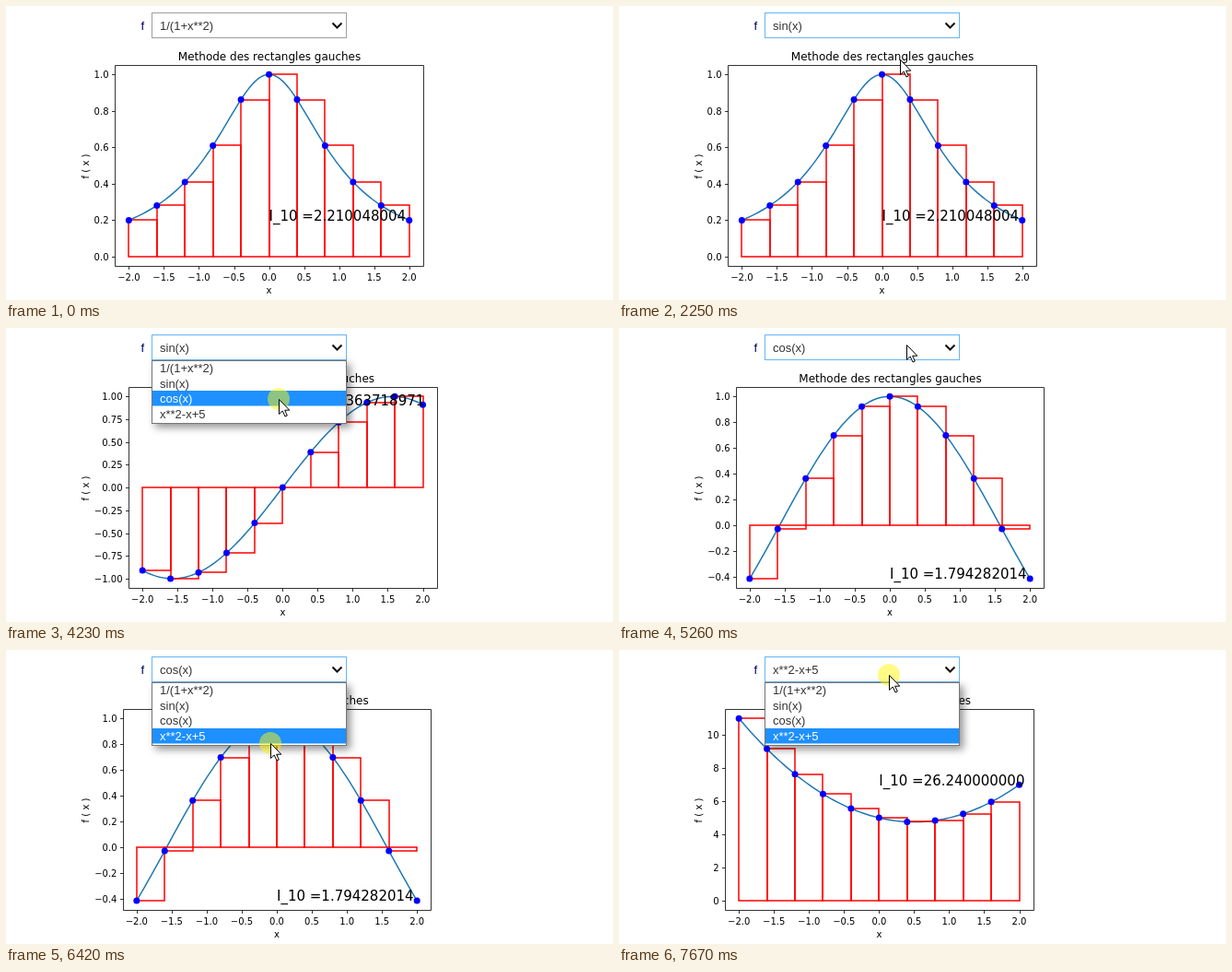
Recreate the animation shown at these times as an HTML page. Size 659 px wide and 319 px high, loop 8 s.

```html
<!DOCTYPE html>
<html lang="fr">
<head>
<meta charset="utf-8">
<title>Methode des rectangles gauches</title>
<style>
  html, body { margin: 0; width: 100%; height: 100%; overflow: hidden; background: #fff; }
  svg { display: block; }
  .plot { font: 10px "DejaVu Sans", sans-serif; }
  .title { font-size: 12px; }
  .sum { font-size: 15px; }
  .frame { fill: none; stroke: #000; stroke-width: .8; }
  .curve { fill: none; stroke: #1f77b4; stroke-width: 1.5; stroke-linejoin: round; }
  .bar { fill: none; stroke: #f00; stroke-width: 1.5; }
  .dot { fill: #00f; }
  .ui { font: 13px "Liberation Sans", Arial, sans-serif; fill: #333; }
  .popup { fill: #fff; stroke: #767676; filter: drop-shadow(4px 4px 4px rgba(0, 0, 0, .42)); }
</style>
</head>
<body>
<svg id="stage" width="659" height="319" viewBox="0 0 659 319"></svg>
<script>
const LOOP = 8000, STEP = 70;
const TOP = 64.4, WIDTH = 334.8, HEIGHT = 217.44;
const ROW_TOP = 35.5, ROW = 16.7;

// ticks: [first, last, step, decimals], first and last counted in steps
const functions = [
  { name: '1/(1+x**2)', f: x => 1 / (1 + x * x), cx: 285.55, range: [0, 1], ticks: [0, 5, .2, 1] },
  { name: 'sin(x)', f: Math.sin, cx: 300.34, range: [-1, 1], ticks: [-4, 4, .25, 2] },
  { name: 'cos(x)', f: Math.cos, cx: 294, range: [Math.cos(2), 1], ticks: [-2, 5, .2, 1] },
  { name: 'x**2-x+5', f: x => x * x - x + 5, cx: 282.35, range: [0, 11], ticks: [0, 5, 2, 0] }
];

// [start, end, x, y]: the pointer reaches x, y at the end time
const moves = [
  [260, 960, 316, 25], [1360, 1900, 305, 58], [2450, 2730, 326, 7],
  [2930, 3140, 324, 24], [3540, 4030, 296, 77], [4570, 4910, 313, 17],
  [5260, 5260, 312, 18], [5660, 6160, 287, 101], [6840, 7400, 293, 27]
];
const clicks = [[1160, 1360], [2030, 2250], [3340, 3540], [4230, 4430], [5390, 5660], [6420, 6640], [7670, LOOP]];
const openings = [[1230, 2250], [3340, 4430], [5460, 6640], [7670, LOOP]];
const choiceTimes = [2250, 4430, 6640];
const plotTimes = [2450, 4630, 6840];
const focusTime = 1160;

const stage = document.getElementById('stage');

function add(parent, tag, attrs, text) {
  const node = document.createElementNS('http://www.w3.org/2000/svg', tag);
  for (const key in attrs) node.setAttribute(key, attrs[key]);
  if (text !== undefined) node.textContent = text;
  return parent.appendChild(node);
}

const show = (node, on) => node.setAttribute('visibility', on ? 'visible' : 'hidden');
const crisp = v => Math.round(v) + .5;

function buildPlot({ f, cx, range: [low, high], ticks: [first, last, step, decimals] }) {
  const g = add(stage, 'g', { class: 'plot' });
  const px = x => cx + x * WIDTH / 4.4;
  const py = y => TOP + HEIGHT * (1 - (.05 + (y - low) / (high - low)) / 1.1);
  const left = crisp(cx - WIDTH / 2), right = crisp(cx + WIDTH / 2);
  const top = crisp(TOP), bottom = crisp(TOP + HEIGHT);
  const label = (v, digits) => v.toFixed(digits).replace('-', '\u2212');

  const points = Array.from({ length: 101 }, (_, i) => i / 25 - 2);
  add(g, 'path', { class: 'curve', d: 'M' + points.map(x => `${px(x).toFixed(2)},${py(f(x)).toFixed(2)}`).join('L') });

  const nodes = Array.from({ length: 11 }, (_, i) => (i - 5) * .4);
  const zero = Math.round(py(0));
  let sum = 0;
  nodes.slice(0, -1).forEach((x, i) => {
    sum += .4 * f(x);
    const a = Math.round(px(x)), b = Math.round(px(nodes[i + 1]));
    add(g, 'path', { class: 'bar', d: `M${a},${zero}V${Math.round(py(f(x)))}H${b}V${zero}Z` });
  });
  nodes.forEach(x => add(g, 'circle', { class: 'dot', cx: px(x), cy: py(f(x)), r: 3.5 }));

  let frame = `M${left},${top}H${right}V${bottom}H${left}Z`;
  for (let k = -4; k <= 4; k++) {
    const x = px(k / 2);
    frame += `M${crisp(x)},${bottom}v3.5`;
    add(g, 'text', { x, y: 298, 'text-anchor': 'middle' }, label(k / 2, 1));
  }
  for (let k = first; k <= last; k++) {
    const y = py(k * step);
    frame += `M${left},${crisp(y)}h-3.5`;
    add(g, 'text', { x: left - 7, y: Math.round(y + 4), 'text-anchor': 'end' }, label(k * step, decimals));
  }
  add(g, 'path', { class: 'frame', d: frame });

  add(g, 'text', { x: cx, y: 312, 'text-anchor': 'middle' }, 'x');
  add(g, 'text', { transform: 'translate(89.5 174) rotate(-90)', 'text-anchor': 'middle' }, 'f ( x )');
  add(g, 'text', { class: 'title', x: cx + .5, y: 59, 'text-anchor': 'middle' }, 'Methode des rectangles gauches');
  add(g, 'text', { class: 'sum', x: px(0), y: py(f(2)) + .5 }, 'I_10 =' + sum.toFixed(9));
  return g;
}

const plots = functions.map(buildPlot);

const ui = add(stage, 'g', { class: 'ui' });
add(ui, 'text', { x: 146.5, y: 26, fill: '#000060' }, 'f');
const box = add(ui, 'rect', { x: 158.5, y: 7.5, width: 211, height: 27, fill: '#fff' });
const value = add(ui, 'text', { x: 167, y: 26 });
add(ui, 'path', { d: 'M354.5,18.5l5,5l5,-5', fill: 'none', stroke: '#111', 'stroke-width': 2 });

const popup = add(ui, 'g', {});
add(popup, 'rect', { class: 'popup', x: 158.5, y: 35.5, width: 211, height: 68 });
const highlight = add(popup, 'rect', { x: 159, width: 210, height: 16.5, fill: '#1e90ff' });
const items = functions.map(({ name }, i) =>
  add(popup, 'text', { x: 167, y: Math.round(48 + i * ROW) }, name));

const pointer = add(stage, 'g', {});
const halo = add(pointer, 'circle', { r: 12, fill: 'rgba(252,248,8,.5)' });
add(pointer, 'path', {
  d: 'M.5,.5V16.5L4.2,13L7,19L9.3,18L6.7,12.2H11.8Z',
  fill: '#fff', stroke: '#000', 'stroke-width': 1
});

function pointerAt(t) {
  let x = 498, y = 277;
  for (const [start, end, toX, toY] of moves) {
    if (t < start) break;
    const steps = Math.round((end - start) / STEP) + 1;
    const p = Math.min(1, (Math.floor((t - start) / STEP) + 1) / steps);
    const eased = p * p * (3 - 2 * p);
    x += (toX - x) * eased;
    y += (toY - y) * eased;
  }
  return [Math.round(x), Math.round(y)];
}

const within = (spans, t) => spans.some(([a, b]) => t >= a && t < b);
const countPast = (times, t) => times.filter(time => t >= time).length;

function draw(t) {
  const plot = countPast(plotTimes, t), choice = countPast(choiceTimes, t);
  const [x, y] = pointerAt(t);
  const active = y > ROW_TOP ? Math.min(3, Math.floor((y - ROW_TOP) / ROW)) : choice;

  plots.forEach((g, i) => show(g, i === plot));
  box.setAttribute('stroke', t < focusTime ? '#9e9e9e' : '#64b5f6');
  value.textContent = functions[choice].name;
  show(popup, within(openings, t));
  highlight.setAttribute('y', Math.round(ROW_TOP - .5 + active * ROW));
  items.forEach((item, i) => item.setAttribute('fill', i === active ? '#fff' : '#333'));
  show(pointer, t >= moves[0][0]);
  show(halo, within(clicks, t));
  pointer.setAttribute('transform', `translate(${x} ${y})`);
}

const began = performance.now();
function tick() {
  draw((performance.now() - began) % LOOP);
  requestAnimationFrame(tick);
}
tick();
</script>
</body>
</html>
```
